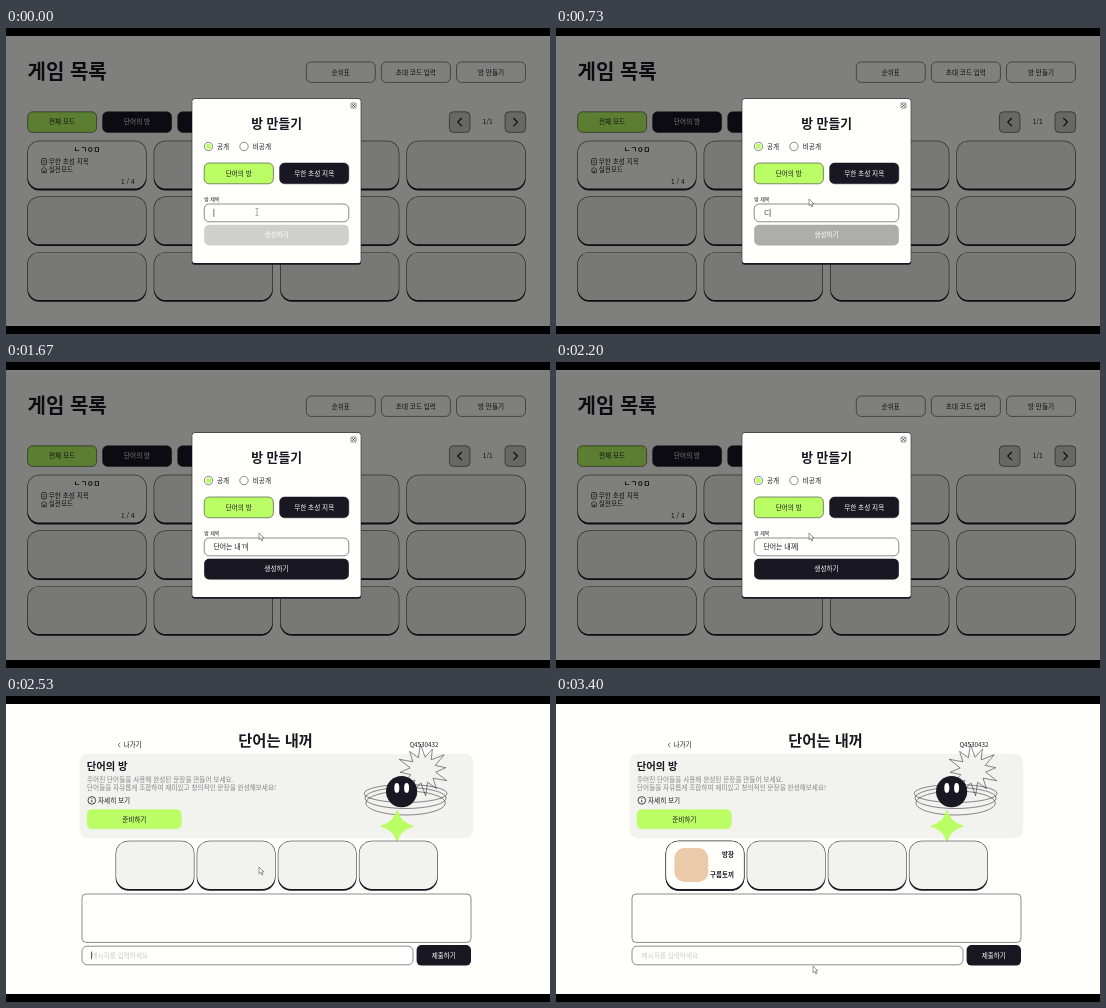
Animation of 544x306 px, one loop 3470 ms. Source, as an HTML page:

```html
<!DOCTYPE html>
<html lang="ko">
<head>
<meta charset="utf-8">
<style>
html, body { margin: 0; width: 100%; height: 100%; overflow: hidden; background: #000; }
svg { display: block; width: 544px; height: 306px; font-family: "Noto Sans CJK KR", "Noto Sans KR", sans-serif; }
text { white-space: pre; }
</style>
</head>
<body>
<svg id="stage" viewBox="0 0 544 306"></svg>
<script>
const INK = '#181722', PAPER = '#fffffb', PALE = '#f2f2ef', GRAY = '#cfcfcb', LIME = '#bafd64';
const LOOP = 3470, SMALL = 6.6;

const rect = (x, y, w, h, r, fill, more = '') =>
  `<rect x="${x}" y="${y}" width="${w}" height="${h}" rx="${r}" fill="${fill}" ${more}/>`;
const line = (d, width = .6, more = '') =>
  `<path d="${d}" fill="none" stroke="${INK}" stroke-width="${width}" ${more}/>`;
const disc = (x, y, r, fill, more = '') => `<circle cx="${x}" cy="${y}" r="${r}" fill="${fill}" ${more}/>`;
const thin = `stroke="${INK}" stroke-width=".5"`;

// y is the vertical middle of the glyphs
function label(x, y, str, { size = SMALL, fill = INK, weight = 400, anchor = 'start', id = '' } = {}) {
  return `<text ${id && `id="${id}"`} x="${x}" y="${y + size * .36}" font-size="${size}" fill="${fill}"` +
    ` font-weight="${weight}" text-anchor="${anchor}">${str}</text>`;
}
const heavy = (x, y, str, size, anchor = 'start') => label(x, y, str, { size, weight: 900, anchor });
const button = (x, y, w, h, str, fill = PAPER, color = INK) =>
  rect(x, y, w, h, 5, fill, thin) + label(x + w / 2, y + h / 2, str, { fill: color, anchor: 'middle' });

// Rounded panel with a thick lower edge
const card = (x, y, w, h, r, fill) =>
  rect(x, y, w, h, r, INK) + rect(x + .5, y + .4, w - 1, h - 2.2, r - .5, fill);
const grid = (n, f) => Array.from({ length: n }, (_, i) => f(i)).join('');

// Star outline alternating between outer and inner radius
function star(x, y, points, outer, inner) {
  const d = grid(points * 2, i => {
    const a = i * Math.PI / points - Math.PI / 2 - .1, k = i % 2;
    const r = k ? inner : outer * (1 - .12 * (i % 4 / 2));
    return `${i ? 'L' : 'M'}${(x + r * Math.cos(a)).toFixed(1)} ${(y + r * Math.sin(a)).toFixed(1)}`;
  });
  return line(d + 'Z', .5);
}

function lobby() {
  return rect(0, 8, 544, 290, 0, PAPER) +
    heavy(21.5, 44, '게임 목록', 20) +
    ['순위표', '초대 코드 입력', '방 만들기'].map((s, i) => button(300.3 + i * 75.1, 34, 69, 20.4, s)).join('') +
    button(21.6, 83.8, 69, 20.6, '전체 모드', LIME) +
    button(96.6, 83.8, 69, 20.6, '단어의 방', INK, PAPER) +
    button(171.7, 83.8, 69, 20.6, '무한 초성 지옥', INK, PAPER) +
    rect(247, 83.8, 20.8, 20.6, 5, PAPER, thin) +
    line('M260.6 91.2A4.3 4.3 0 1 0 261.4 95.6', 1.2) +
    `<path d="M262 89v4.4h-4.4z" fill="${INK}"/>` +
    rect(443.4, 83.8, 20.6, 20.6, 4, GRAY, thin) + line('M455.8 90l-4 4.1 4 4.1', 1.2) +
    label(481.8, 94, '1/1', { anchor: 'middle' }) +
    rect(499, 83.8, 20.6, 20.6, 4, GRAY, thin) + line('M507.4 90l4 4.1-4 4.1', 1.2) +
    grid(12, i => card(21.3 + i % 4 * 126.4, 112.8 + (i >> 2) * 55.7, 119.2, 49.6, 12, i ? PALE : PAPER)) +
    heavy(81, 121.2, 'ㄴㄱㅇㅁ', 7.2, 'middle') +
    rect(35.6, 130.6, 4.8, 6.2, 1, 'none', `stroke="${INK}" stroke-width=".7"`) +
    line('M36.8 132.7h2.4M36.8 134.7h2.4') +
    label(42.8, 133.7, '무한 초성 지옥') +
    line('M35 141.8l3-2.4 3 2.4M36 141.5v3.2h4.4v-3.2M37.7 144.6v-1.7h1v1.7') +
    label(42.8, 142, '실전모드') +
    label(121.8, 153.4, '1 / 4', { anchor: 'middle' });
}

function dialog() {
  return rect(0, 8, 544, 290, 0, '#000', 'opacity=".5"') +
    card(185.8, 70.6, 169.4, 166.2, 3, PAPER) +
    rect(345, 75, 5, 5, .8, 'none', thin) + line('M346 76l3 3m0-3l-3 3') +
    heavy(270.6, 95, '방 만들기', 12.8, 'middle') +
    disc(202.5, 118.5, 4.2, PAPER, thin) + disc(202.5, 118.5, 2.7, LIME) + label(211, 118.6, '공개') +
    disc(238, 118.5, 4.2, PAPER, thin) + label(246.8, 118.6, '비공개') +
    button(198.2, 135, 69.2, 20.8, '단어의 방', LIME) +
    button(273.6, 135, 69.2, 20.8, '무한 초성 지옥', INK, PAPER) +
    label(198.2, 170.8, '방 제목', { size: 5 }) +
    rect(198.2, 176, 144.6, 17.8, 5, PAPER, thin) +
    label(207.4, 184.8, '', { size: 6.9, id: 'entry' }) +
    `<path id="caret" d="M0 180.8v8" stroke="${INK}" stroke-width=".6"/>` +
    rect(198.2, 196.8, 144.6, 20.6, 5, GRAY) +
    rect(198.2, 196.8, 144.6, 20.6, 5, INK, 'id="ready"') +
    label(270.5, 207, '생성하기', { fill: PAPER, anchor: 'middle' });
}

function mascot() {
  return star(417, 74, 12, 26, 13) +
    [97.5, 102, 107].map((y, i) =>
      `<ellipse cx="399.6" cy="${y}" rx="${41.4 - i * .8}" ry="${9 + i * 1.5}" fill="none" ${thin}/>`).join('') +
    disc(395.6, 95.6, 15.6, INK) +
    [390.8, 400.6].map(x => `<ellipse cx="${x}" cy="92" rx="2.5" ry="4.9" fill="${PAPER}"/>`).join('') +
    `<path d="M391 115Q394 127 406.5 130.2Q394 133 391 145Q388 133 375.5 130.2Q388 127 391 115Z"
      fill="${LIME}" stroke="${LIME}" stroke-width="1.6" stroke-linejoin="round"/>`;
}

function room() {
  const soft = { fill: '#85858a' };
  return rect(0, 8, 544, 290, 0, PAPER) +
    line('M114.2 46.8l-2 2.2 2 2.2') + label(117.4, 48.8, '나가기') +
    heavy(269.6, 44.6, '단어는 내꺼', 15.3, 'middle') +
    label(418, 48.8, 'Q4530432', { anchor: 'middle', size: 6.3 }) +
    rect(73.6, 57.8, 393.6, 84.4, 8, PALE) +
    heavy(80.8, 70.5, '단어의 방', 10.3) +
    label(81, 83.8, '주어진 단어들을 사용해 완성된 문장을 만들어 보세요.', soft) +
    label(81, 92, '단어들을 자유롭게 조합하여 재미있고 창의적인 문장을 완성해보세요!', soft) +
    disc(85.8, 104.4, 3.8, 'none', `stroke="${INK}" stroke-width=".8"`) +
    line('M85.8 104v2.4M85.8 102.2v.9', .8) + label(92, 104.4, '자세히 보기') +
    rect(80.4, 113, 95.6, 20.4, 5.5, LIME, 'opacity=".5"') +
    rect(81.2, 113.8, 94, 18.8, 5, LIME) + label(128.3, 123.2, '준비하기', { anchor: 'middle' }) +
    mascot() +
    grid(4, i => card(109.6 + i * 81.1, 144.8, 78.8, 50, 13, PALE)) +
    `<g id="player">${card(109.6, 144.8, 78.8, 50, 13, PAPER)}` +
    rect(118.4, 152, 33.8, 34, 10, '#eacaa8') +
    heavy(178, 158.8, '방장', 6.5, 'end') + heavy(178, 179, '구름토끼', 6.5, 'end') + '</g>' +
    rect(76, 198, 389, 48.4, 4, PAPER, thin) +
    rect(76, 250.2, 331, 18.6, 5, PAPER, thin) +
    label(85.6, 259.4, '메시지를 입력하세요.', { fill: '#c9c9c8' }) +
    '<g id="chatCaret">' + line('M85.5 255.6v7.6', .7) + '</g>' +
    rect(410.6, 249, 54.4, 20.6, 5, INK) +
    label(437.8, 259.3, '제출하기', { fill: PAPER, anchor: 'middle' });
}

const $ = id => document.getElementById(id);
$('stage').innerHTML = lobby() + `<g id="dialog">${dialog()}</g><g id="room">${room()}</g>` +
  `<path id="arrow" d="M0 0v6.8l1.6-1.5 1.2 2.7 1.1-.5-1.2-2.6h2.2z" fill="${PAPER}" stroke="#55555a" stroke-width=".6"/>` +
  '<path id="beam" d="M-1.5-3.4h3M0-3.4v6.8M-1.5 3.4h3" fill="none" stroke="#77777a" stroke-width=".6"/>' +
  rect(0, 0, 544, 8, 0, '#000') + rect(0, 298, 544, 8, 0, '#000');

const TYPING = [[0, ''], [730, 'ㄷ'], [800, '다'], [870, '단'], [1270, '단어'], [1330, '단언'], [1400, '단어느'],
  [1470, '단어는'], [1530, '단어는 내'], [1670, '단어는 내ㄲ'], [1730, '단어는 내꺼']];
// time, x, y of the pointer
const POINTER = [[0, 251, 184], [70, 252, 179], [130, 253, 171], [3000, 253, 171], [3070, 253.5, 184],
  [3200, 255, 250], [3270, 256, 284], [3330, 257, 278], [3400, 257, 270], [LOOP, 257, 270]];

const show = (id, on) => $(id).setAttribute('visibility', on ? 'inherit' : 'hidden');

function pointerAt(t) {
  const i = POINTER.findIndex(p => p[0] > t);
  const [t0, x0, y0] = POINTER[i - 1], [t1, x1, y1] = POINTER[i];
  const k = (t - t0) / (t1 - t0);
  return [x0 + (x1 - x0) * k, y0 + (y1 - y0) * k];
}

function draw() {
  const t = performance.now() % LOOP;
  const entry = $('entry'), str = TYPING.findLast(k => k[0] <= t)[1];
  if (entry.textContent !== str) entry.textContent = str;
  const end = 207.8 + (str ? entry.getComputedTextLength() : 0);
  $('caret').setAttribute('transform', `translate(${end})`);
  show('caret', t < 330 || t >= 730);
  $('ready').setAttribute('opacity', Math.min(1, Math.max(0, (t - 700) / 170)));

  show('dialog', t < 2270);
  show('room', t >= 2530);
  show('player', t >= 2670);
  show('chatCaret', t < 3070);
  // hidden parents must also hide their switched children
  if (t >= 2270) show('caret', false);

  const [x, y] = pointerAt(t), typing = t < 130;
  for (const id of ['arrow', 'beam']) $(id).setAttribute('transform', `translate(${x} ${y})`);
  show('beam', typing);
  show('arrow', !typing);
  requestAnimationFrame(draw);
}
draw();
</script>
</body>
</html>
```
